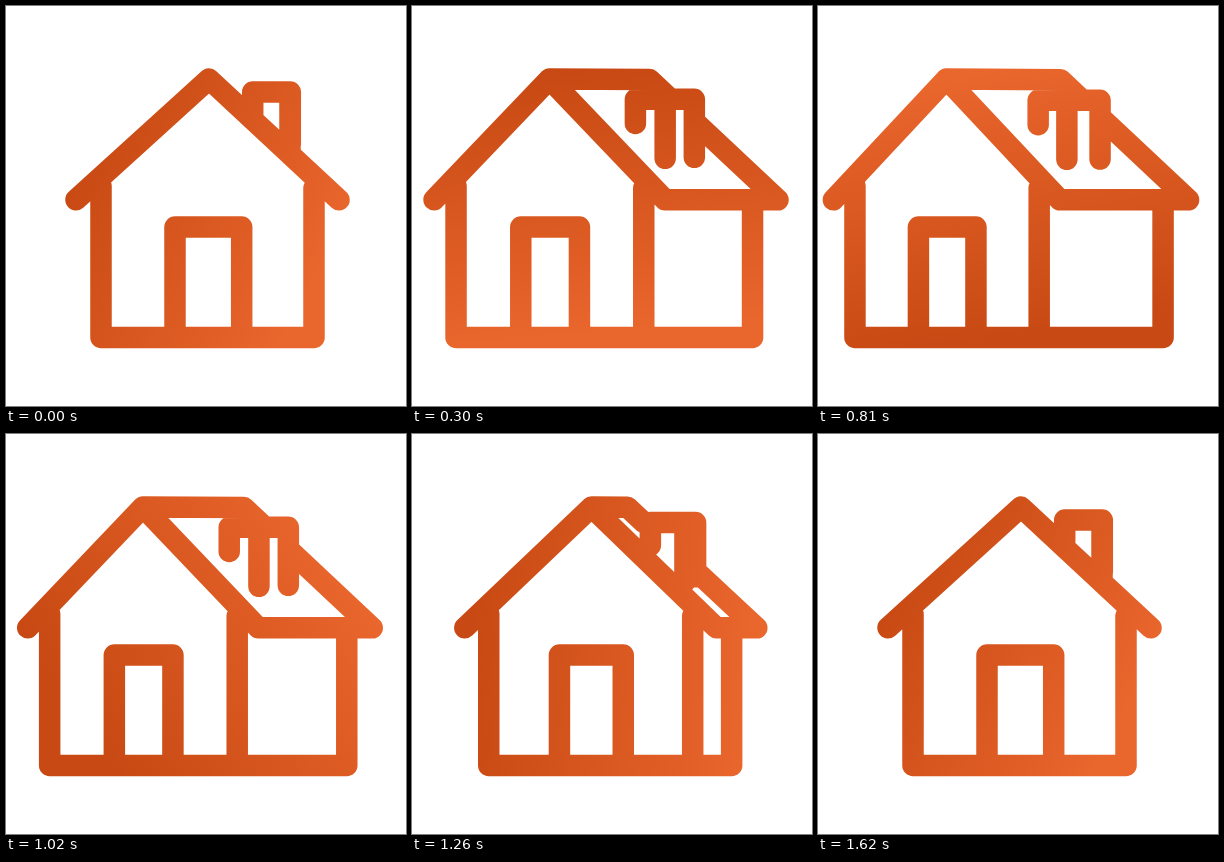
An HTML page with a canvas that plays this animation: 400 by 400 pixels, repeating every 4650 ms.

```html
<!DOCTYPE html>
<html lang="en">
<head>
<meta charset="utf-8">
<title>House</title>
<style>
  html, body { margin: 0; width: 100%; height: 100%; overflow: hidden; background: #fff; }
  canvas { display: block; width: 100vmin; height: 100vmin; }
</style>
</head>
<body>
<canvas id="stage" width="400" height="400"></canvas>
<script>
const ctx = document.getElementById('stage').getContext('2d');
const LOOP = 4650, STEP = 30, WIDEN = 600, END = 1620;
const DARK = '#c84913', LIGHT = '#e9662d';

function bezier(x1, y1, x2, y2) {
  const at = (a, b, s) => 3 * a * s * (1 - s) ** 2 + 3 * b * s * s * (1 - s) + s ** 3;
  return x => {
    if (x <= 0) return 0;
    if (x >= 1) return 1;
    let lo = 0, hi = 1;
    for (let i = 0; i < 30; i++) {
      const mid = (lo + hi) / 2;
      if (at(x1, x2, mid) < x) lo = mid; else hi = mid;
    }
    return at(y1, y2, lo);
  };
}

const easeOpen = bezier(0.13, 0, 0.1, 1);
const easeClose = bezier(0.85, 0, 0.4, 1);
const easeTurn = bezier(0.3, 0.1, 0.5, 1);
const mix = (a, b, p) => a + (b - a) * p;

function line(...points) {
  points.forEach(([x, y], i) => i ? ctx.lineTo(x, y) : ctx.moveTo(x, y));
}

// p = 0: front view, p = 1: widened view
function house(p) {
  const at = (a, b) => mix(a, b, p);
  const base = 331.5, eave = 193.8;
  const left = at(95, 35.5), front = at(308, 219), back = at(308, 346);
  const apex = [at(203, 126.5), 73];
  const ridge = [at(203, 243.5), at(73, 73.7)];
  const tip = [at(333, 371.5), eave];
  const doorL = at(169, 98.7), doorR = at(235.7, 156);
  const top = at(86, 94.5), potL = at(246.7, 219.5), potM = at(284, 248), potR = at(284.3, 282);

  line([left, 180], [left, base], [back, base], [back, eave]);
  line([front, 182], [front, base]);
  line([doorL, base], [doorL, 221], [doorR, 221], [doorR, base]);
  line([at(70, 14), eave], apex, [at(333, 239.5), eave], tip);

  // the chimney hides the middle of the rear slope
  const slope = (tip[1] - ridge[1]) / (tip[0] - ridge[0]);
  line(apex, ridge, [ridge[0] + (top - ridge[1]) / slope, top]);
  line([potR, ridge[1] + (potR - ridge[0]) * slope], tip);

  line([potL, at(108, 119)], [potL, top], [potR, top], [potR, at(138, 153.5)]);
  line([potM, top], [potM, at(145, 153.5)]);
}

function gradient(angle, p) {
  const cx = mix(202, 197, p), cy = 195;
  const dx = mix(132, 170, p) * Math.cos(angle), dy = 132 * Math.sin(angle);
  const g = ctx.createLinearGradient(cx - dx, cy - dy, cx + dx, cy + dy);
  g.addColorStop(0, DARK);
  g.addColorStop(1, LIGHT);
  return g;
}

function draw(t) {
  const p = t < WIDEN ? easeOpen(t / WIDEN) : 1 - easeClose((t - WIDEN) / (END - WIDEN));
  const angle = (28 + 360 * easeTurn(t / END)) * Math.PI / 180;
  ctx.fillStyle = '#fff';
  ctx.fillRect(0, 0, 400, 400);
  ctx.lineWidth = 21.5;
  ctx.lineCap = ctx.lineJoin = 'round';
  ctx.strokeStyle = gradient(angle, p);
  ctx.beginPath();
  house(p);
  ctx.stroke();
}

const start = performance.now();
function tick() {
  const t = (performance.now() - start) % LOOP;
  draw(Math.min(END, Math.floor(t / STEP) * STEP));
  requestAnimationFrame(tick);
}
tick();
</script>
</body>
</html>
```
